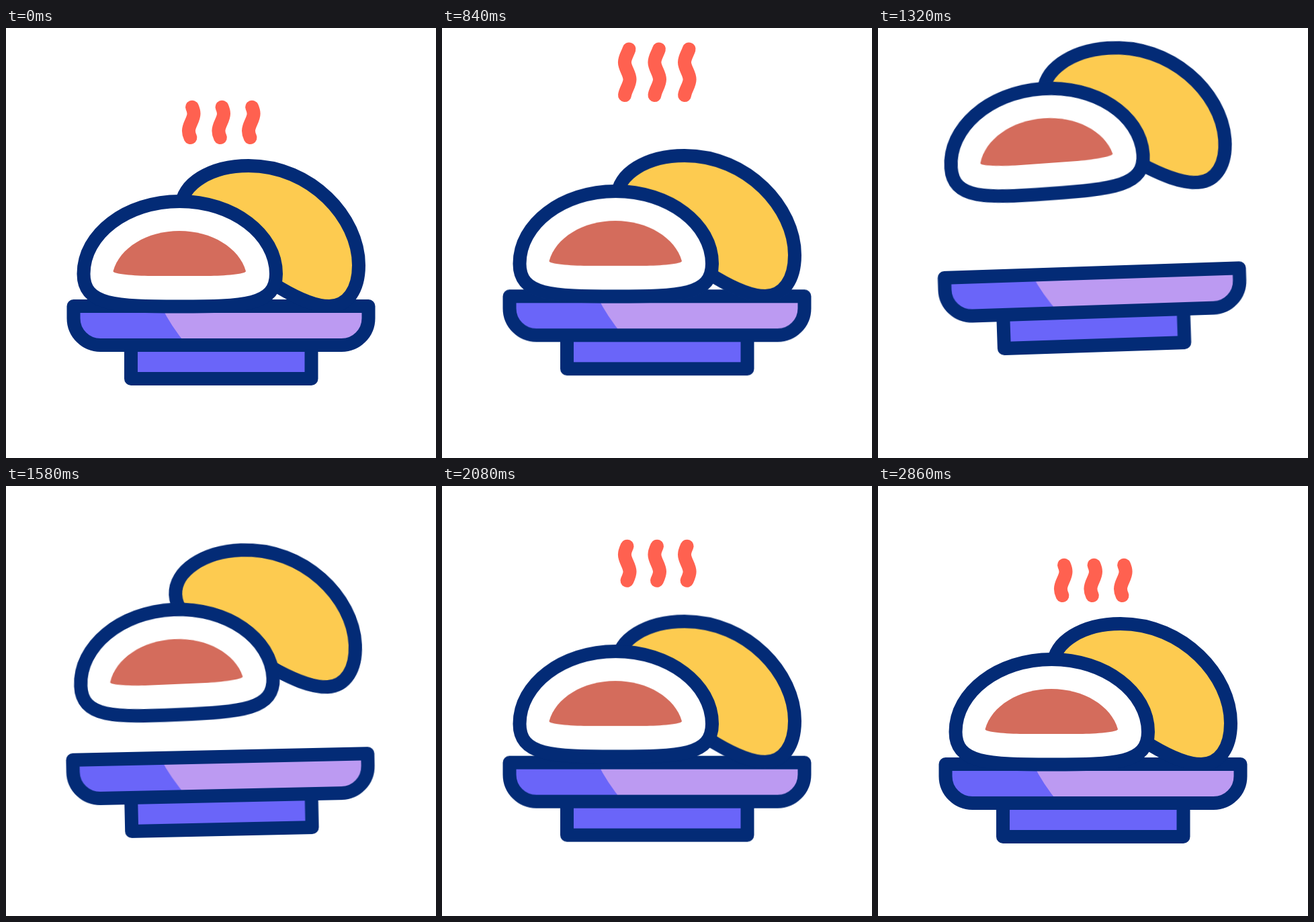
An HTML page without scripts that plays this animation: 640 by 640 pixels, repeating every 3.6 s.

```html
<!DOCTYPE html>
<html lang="en">
<head>
<meta charset="utf-8">
<title>Steamed buns</title>
<style>
  html, body { margin: 0; width: 100%; height: 100%; overflow: hidden; background: #fff; }
  svg { display: block; width: 100%; height: 100%; }

  :root {
    --line: #032b76;
    --blue: #6a65f9;
    --rise: cubic-bezier(.33, .67, .67, 1);
    --fall: cubic-bezier(.33, 0, .67, .33);
  }

  .line { stroke: var(--line); stroke-width: 20; stroke-linejoin: round; }
  .steam { fill: none; stroke: #ff6150; stroke-width: 20; stroke-linecap: round; }
  .steam, .plate, .front, .back { animation: 3600ms linear infinite; }

  .plate, .front, .back { transform-origin: 320px 468px; }
  .plate { animation-name: plate; }
  .front { animation-name: front; }
  .back { animation-name: back; }
  .steam { animation-name: steam; }

  /* dash length = visible wisp, offset = how far its tail has risen */
  @keyframes steam {
    0%, 3.889% { stroke-dasharray: 45 999; stroke-dashoffset: 0; animation-timing-function: cubic-bezier(.4, .1, .7, .8); }
    18.889% { stroke-dasharray: 69 999; stroke-dashoffset: -45; }
    23.333% { stroke-dasharray: 69 999; stroke-dashoffset: -62.5; animation-timing-function: cubic-bezier(.4, .2, .8, .8); }
    33.333% { stroke-dasharray: 40 999; stroke-dashoffset: -220; animation-timing-function: step-end; }
    50% { stroke-dasharray: 0 999; stroke-dashoffset: 0; }
    52.222% { stroke-dasharray: 15 999; stroke-dashoffset: -6; }
    57.778% { stroke-dasharray: 51 999; stroke-dashoffset: -22; }
    63.889% { stroke-dasharray: 72 999; stroke-dashoffset: -50; animation-timing-function: cubic-bezier(.4, .2, .8, .8); }
    71.111% { stroke-dasharray: 40 999; stroke-dashoffset: -220; animation-timing-function: step-end; }
    71.2% { stroke-dasharray: 0 999; stroke-dashoffset: 0; animation-timing-function: cubic-bezier(.3, .5, .6, 1); }
    78.889%, 100% { stroke-dasharray: 45 999; stroke-dashoffset: 0; }
  }

  @keyframes plate {
    0%, 18.889% { transform: translateY(0) rotate(0); animation-timing-function: var(--fall); }
    23.333% { transform: translateY(-14.5px) rotate(0); }
    27.778% { transform: translateY(-46px) rotate(-.4deg); animation-timing-function: var(--rise); }
    31.667% { transform: translateY(-54px) rotate(-1.5deg); animation-timing-function: ease-in; }
    36.667% { transform: translateY(-49.6px) rotate(-1.9deg); }
    43.889% { transform: translateY(-11px) rotate(-1.25deg); animation-timing-function: var(--rise); }
    46.667% { transform: translateY(2px) rotate(0); animation-timing-function: ease-in-out; }
    52.222% { transform: translateY(-5px) rotate(0); }
    57.778% { transform: translateY(-2.4px) rotate(0); animation-timing-function: ease-out; }
    63.889%, 100% { transform: translateY(0) rotate(0); }
  }

  @keyframes front {
    0%, 18.889% { transform: translateY(0) rotate(0); animation-timing-function: var(--fall); }
    23.333% { transform: translateY(-14.8px) rotate(0); }
    27.778% { transform: translateY(-62px) rotate(-.8deg); animation-timing-function: var(--rise); }
    36.667% { transform: translateY(-172.6px) rotate(-4.1deg); animation-timing-function: var(--fall); }
    43.889% { transform: translateY(-77.6px) rotate(-2.5deg); }
    46.944% { transform: translateY(0) rotate(0); animation-timing-function: var(--rise); }
    52.222% { transform: translateY(-30px) rotate(0); animation-timing-function: ease-in-out; }
    57.778% { transform: translateY(-12px) rotate(0); animation-timing-function: ease-out; }
    63.889% { transform: translateY(-.7px) rotate(0); }
    78%, 100% { transform: translateY(0) rotate(0); }
  }

  @keyframes back {
    0%, 18.889% { transform: translateY(0) rotate(0); animation-timing-function: var(--fall); }
    23.333% { transform: translateY(-14.8px) rotate(0); }
    27.778% { transform: translateY(-62px) rotate(-.8deg); animation-timing-function: var(--rise); }
    36.667% { transform: translateY(-173px) rotate(-4.1deg); animation-timing-function: var(--fall); }
    43.889% { transform: translateY(-108.7px) rotate(-2.5deg); }
    48.611% { transform: translateY(0) rotate(0); animation-timing-function: var(--rise); }
    52.222% { transform: translateY(-24px) rotate(0); animation-timing-function: ease-in-out; }
    57.778% { transform: translateY(-3.5px) rotate(0); animation-timing-function: ease-out; }
    63.889% { transform: translateY(-.7px) rotate(0); }
    78%, 100% { transform: translateY(0) rotate(0); }
  }
</style>
</head>
<body>
<svg viewBox="0 0 640 640">
  <defs>
    <path id="wisp" pathLength="214" d="M-1.3 163Q-3.8 158-3.8 153c0-9 7.6-16.5 7.6-25.5
      s-7.6-16.5-7.6-25.5 s7.6-16.5 7.6-25.5 s-7.6-16.5-7.6-25.5 s7.6-16.5 7.6-25.5
      s-7.6-16.5-7.6-25.5 s7.6-16.5 7.6-25.5 s-7.6-16.5-7.6-25.5"/>
    <path id="dish" d="M100.5 414H539.5V432A40 40 0 0 1 499.5 472H140.5A40 40 0 0 1 100.5 432Z"/>
  </defs>

  <g class="plate">
    <path class="line" fill="var(--blue)" d="M186 472H454.5V522H186Z"/>
    <use href="#dish" fill="#bc9af2"/>
    <path fill="var(--blue)" d="M100.5 414H231Q245 443 269 472H140.5A40 40 0 0 1 100.5 432Z"/>
    <use href="#dish" class="line" fill="none"/>
  </g>

  <path class="back line" fill="#fdcb50" d="M361 205C455 205 525 283 525 353C525 390 508 414 481 414
    C455 414 425 397 408 387C350 352 261 320 261 267C261 232 305 205 361 205Z"/>

  <g class="front">
    <path class="line" fill="#fff" d="M258.5 258C338 258 402 307 402 366C402 413 354 414.5 258.5 414.5
      S115.5 413 115.5 366C115.5 307 179 258 258.5 258Z"/>
    <path fill="#d46c5c" d="M159.5 362C169 327 210 302 258 302S347 327 357 362
      C357 366 325 369 300 369H216C191 369 159 366 159.5 362Z"/>
  </g>

  <use class="steam" href="#wisp" x="275.7"/>
  <use class="steam" href="#wisp" x="320.2"/>
  <use class="steam" href="#wisp" x="364.8"/>
</svg>
</body>
</html>
```
